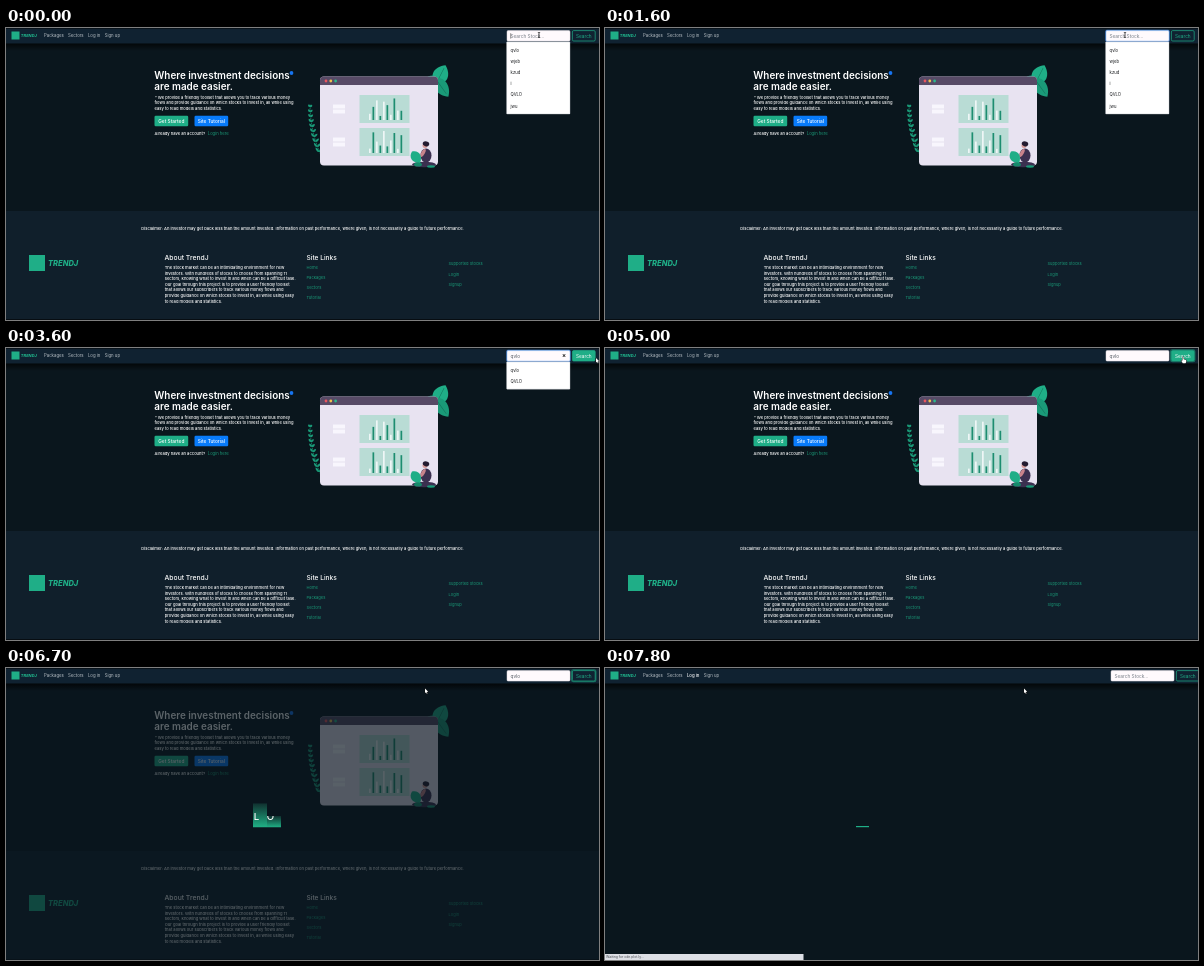
Recreate the animation shown at these times as an HTML page with a canvas. Size 593 by 292 pixels, loop 8 s.

```html
<!DOCTYPE html>
<html lang="en">
<head>
<meta charset="utf-8">
<title>Stock search</title>
<style>
html, body { margin: 0; width: 100%; height: 100%; overflow: hidden; background: #0a161d; }
canvas { display: block; width: 593px; height: 292px; }
</style>
</head>
<body>
<canvas id="stage"></canvas>
<script>
const W = 593, H = 292, LOOP = 8000;
const GREEN = '#1fae87', LEAF = '#1a9a78', NIGHT = '#0a161d', PANEL = '#101f2b', WHITE = '#fff';
const FONT = 'Inter, "Open Sans", sans-serif';
const BRAND = 'TrendJ', MARK = BRAND.toUpperCase(), QUERY = 'qvlo';
const canvas = document.getElementById('stage');
const c = canvas.getContext('2d');
const dpr = window.devicePixelRatio || 1;
canvas.width = W * dpr;
canvas.height = H * dpr;

const ramp = (t, a, b) => Math.max(0, Math.min(1, (t - a) / (b - a)));
const ease = p => p * p * (3 - 2 * p);

// Draws text centred on y and returns its width.
function text(s, x, y, size, { color = WHITE, weight = 400, align = 'left', style = '' } = {}) {
  c.font = `${style} ${weight} ${size}px ${FONT}`;
  c.textAlign = align;
  c.fillStyle = color;
  c.fillText(s, x, y + size * 0.36);
  return c.measureText(s).width;
}

function lines(list, x, y, step, size, look) {
  list.forEach((s, i) => text(s, x, y + i * step, size, look));
}

function rect(x, y, w, h, color) {
  c.fillStyle = color;
  c.fillRect(x, y, w, h);
}

function round(x, y, w, h, r, fill, stroke, lw = 0.7) {
  c.beginPath();
  c.roundRect(x, y, w, h, r);
  if (fill) { c.fillStyle = fill; c.fill(); }
  if (stroke) { c.strokeStyle = stroke; c.lineWidth = lw; c.stroke(); }
}

function oval(x, y, rx, ry, color, turn = 0) {
  c.fillStyle = color;
  c.beginPath();
  c.ellipse(x, y, rx, ry, turn, 0, 7);
  c.fill();
}

const dot = (x, y, r, color) => oval(x, y, r, r, color);

// A pointed leaf from (x, y): length n, half width w, angle a.
function leaf(x, y, n, w, a, color, vein) {
  c.save();
  c.translate(x, y);
  c.rotate(a);
  c.fillStyle = color;
  c.beginPath();
  c.moveTo(0, 0);
  c.bezierCurveTo(n * 0.2, -w * 1.5, n * 0.7, -w * 1.4, n, 0);
  c.bezierCurveTo(n * 0.7, w * 1.4, n * 0.2, w * 1.5, 0, 0);
  c.fill();
  if (vein) rect(0, -0.25, n * 0.85, 0.5, vein);
  c.restore();
}

function plants() {
  const vein = '#137059';
  leaf(433, 57, 14, 5, -2.5, LEAF, vein);
  leaf(430, 56, 21, 7, -1.1, GREEN, vein);
  leaf(429, 50, 23, 6, 0.95, LEAF, vein);
  for (let i = 0; i < 30; i++) {
    const p = i / 30, x = 304 + 11 * p * p, y = 77 + 50 * p;
    dot(x, y, 0.5, LEAF);
    if (i % 3 === 0) [-2.2, -0.75].forEach(a => leaf(x, y + 2, 3 + 3 * p, 1, a, LEAF));
  }
}

function chart(y, phase) {
  rect(353.5, y, 50, 28, '#b9dcd5');
  for (let i = 0; i < 10; i++) {
    const h = 13 + 9 * Math.sin(i * 2.3 + phase);
    rect(363 + i * 3.5, y + 25 - h, 1.7, h, i % 2 ? '#1d8d70' : '#eef6f6');
  }
}

function reader() {
  oval(418, 136.5, 12, 2.8, '#3b3050');
  oval(420, 127.5, 5.5, 7, '#3b3050');
  oval(417, 125, 1.8, 4.5, '#c9838b', 0.5);
  dot(419, 117.5, 2.5, '#d99b98');
  oval(420, 115.8, 3.3, 2.5, '#251c30', 0.3);
  leaf(406, 123.5, 14, 4.5, 0.95, GREEN);
  oval(412, 136.5, 4, 2, '#178a6c');
  oval(425, 138.5, 4, 1.2, LEAF);
}

function picture() {
  plants();
  round(314, 48.5, 118, 89, 4, '#e8e3f1');
  round(314, 48.5, 118, 8.5, [4, 4, 0, 0], '#574a66');
  ['#e95560', '#efc04e', '#2bb88c'].forEach((k, i) => dot(320 + i * 4.8, 53, 1.4, k));
  [67, 100].forEach((y, i) => {
    rect(327, y + 9.5, 12, 9, '#f8f6fd');
    rect(327, y + 13.7, 12, 0.6, '#d9d4e4');
    chart(y, 4 + i);
  });
  reader();
}

function button(s, x, color) {
  round(x, 87.7, 33.7, 10.6, 1.2, color);
  text(s, x + 16.8, 93, 4.8, { weight: 500, align: 'center' });
}

function hero() {
  const body = { weight: 500 };
  rect(0, 0, W, H, NIGHT);
  lines(['Where investment decisions', 'are made easier.'], 148.3, 47, 11, 9.9, { weight: 600 });
  dot(285.5, 45, 1.9, '#1674f0');
  text('“', 148.7, 69.3, 4.1, body);
  text('We provide a friendly toolset that allows you to track various money', 151.8, 69.3, 4.1, body);
  lines(['flows and provide guidance on which stocks to invest in, all while using',
    'easy to read models and statistics.'], 148.5, 74.9, 5.6, 4.1, body);
  button('Get Started', 148.5, GREEN);
  button('Site Tutorial', 188.5, '#087bfa');
  text('Already have an account?', 148.5, 105.5, 4.1, body);
  text('Login here', 201.8, 105.5, 4.15, { color: LEAF });
  picture();
}

function footer() {
  const body = { weight: 500 }, link = { color: LEAF };
  rect(0, 183, W, 108, PANEL);
  rect(0, 291, W, 1, '#070d12');
  text('Disclaimer: An investor may get back less than the amount invested. Information on past performance, ' +
    'where given, is not necessarily a guide to future performance.', 296.5, 200.3, 4.1, { weight: 500, align: 'center' });
  rect(23, 227, 16, 16, GREEN);
  text(MARK, 42, 235.5, 7.5, { color: GREEN, weight: 800, style: 'italic' });
  text('About ' + BRAND, 158.5, 230, 6.8, body);
  lines(['The stock market can be an intimidating environment for new',
    'investors. With hundreds of stocks to choose from spanning 11',
    'sectors, knowing what to invest in and when can be a difficult task.',
    'Our goal through this project is to provide a user friendly toolset',
    'that allows our subscribers to track various money flows and',
    'provide guidance on which stocks to invest in, all while using easy',
    'to read models and statistics.'], 158.7, 239.5, 5.6, 4.1, body);
  text('Site Links', 300.5, 230, 6.6, body);
  lines(['Home', 'Packages', 'Sectors', 'Tutorial'], 300.5, 239.4, 10.05, 4.1, link);
  lines(['Supported Stocks', 'Login', 'Signup'], 442.5, 236, 10.05, 4.05, link);
}

// Letters shown through bars that rise and sink one after another.
function loader(t) {
  [...'LOADING'].forEach((ch, i) => {
    const p = ramp(t, 6540 + i * 100, 7030 + i * 100);
    const h = 24.3 * Math.min(1, 1.25 * Math.sin(Math.PI * p));
    if (h < 0.3) return;
    const x = 247 + i * 14, top = 159.5 - h;
    const g = c.createLinearGradient(0, top, 0, 159.5);
    g.addColorStop(0, '#10302f');
    g.addColorStop(1, '#20b286');
    c.save();
    c.beginPath();
    c.rect(x, top, 14, h);
    c.clip();
    rect(x, top, 14, h, g);
    text(ch, x + 3.5, 148.5, 9.6, { weight: 500, align: 'center' });
    c.restore();
  });
}

// Pointer moves: start, end, then the place reached
const MOVES = [[100, 1300, 520, 7], [2400, 2600, 570, 47], [3000, 3600, 590, 10],
  [3700, 4400, 578, 9], [5400, 6200, 419, 20.5]];

function pointerAt(t) {
  return MOVES.reduce(([x, y], [a, b, toX, toY]) => {
    const p = ease(ramp(t, a, b));
    return [x + (toX - x) * p, y + (toY - y) * p];
  }, [533, 7]);
}

const SHAPES = {
  beam: 'M-.4-2.7V2.7H.4V-2.7ZM-1.2-3V-2.5H1.2V-3ZM-1.2 2.5V3H1.2V2.5Z',
  arrow: 'M0 0V4.6L1.1 3.7 1.8 5.3 2.5 5 1.8 3.4 3.2 3.3Z',
  hand: 'M-.5 0H.6V2.3L3.2 3V5L2.5 6.2H-.2L-1.8 3.7-.5 3.6Z'
};

function pointer(x, y, kind) {
  const path = new Path2D(SHAPES[kind]);
  c.save();
  c.translate(x, y);
  c.lineWidth = 0.9;
  c.strokeStyle = '#111';
  c.fillStyle = kind === 'beam' ? '#222' : WHITE;
  if (kind !== 'beam') c.stroke(path);
  c.fill(path);
  c.restore();
}

function bar(fresh) {
  const shade = c.createLinearGradient(0, 15, 0, 23);
  shade.addColorStop(0, 'rgba(0,0,0,.75)');
  shade.addColorStop(1, 'rgba(0,0,0,0)');
  rect(0, 15, W, 8, shade);
  rect(0, 0, W, 15.5, '#102231');
  rect(0, 0, W, 1, '#08121a');
  rect(5.5, 3.5, 8, 8, GREEN);
  text(MARK, 14.8, 8, 4, { color: GREEN, weight: 800, style: 'italic' });
  let x = 38;
  for (const s of ['Packages', 'Sectors', 'Log in', 'Sign up']) {
    const lit = fresh && s === 'Log in';
    x += 4.3 + text(s, x, 7.7, 4.3, { color: lit ? WHITE : '#b9c0c6', weight: lit ? 500 : 400 });
  }
}

function search(t, fresh, hover) {
  const dx = fresh ? 5 : 0, focused = t < 4200;
  const typed = fresh ? '' : QUERY.slice(0, Math.max(0, Math.ceil((t - 1800) / 130)));
  const glow = ramp(t, 100, 300) * (1 - ramp(t, 4200, 4300));
  round(500.3, 1.8, 64.4, 12.1, 1.6, `rgba(70,140,235,${glow * 0.7})`);
  round(501 + dx, 2.6, 63, 10.5, 1.2, '#fffafd', glow > 0.5 ? '#86b9f5' : '#dcd8df', 0.5);
  const w = text(typed || 'Search Stock...', 504.5 + dx, 8, 4.75, { color: typed ? '#555c63' : '#767d85' });
  if (focused && t % 1000 < 500) rect(504.6 + (typed && w), 5.2, 0.5, 5.4, '#222');
  if (focused && typed) text('×', 558, 7.9, 6, { color: '#222', weight: 700, align: 'center' });

  if (t > 4400 && !fresh) round(565.6, 1.8, 24.3, 12, 1.8, null, 'rgba(31,174,135,.55)', 1.1);
  round(566.4 + dx, 2.6, 22.8, 10.4, 1.3, hover ? GREEN : null, GREEN);
  text('Search', 577.8 + dx, 8, 4.75, { color: hover ? WHITE : GREEN, align: 'center' });

  if (focused) {
    const hits = [QUERY, 'wjeb', 'kzud', 'i', QUERY.toUpperCase(), 'jwu']
      .filter(s => s.toLowerCase().startsWith(typed));
    round(500.6, 13.8, 63.4, 5 + hits.length * 11.2, 0.6, WHITE, '#b9bcc2', 0.4);
    lines(hits, 504.6, 22, 11.2, 4.2, { color: '#15171a' });
  }
}

function draw(t) {
  c.setTransform(dpr, 0, 0, dpr, 0, 0);
  const fresh = t >= 7400;
  const [x, y] = pointerAt(t);
  const hover = t > 3000 && x > 566 && x < 590.5 && y < 14;
  if (fresh) {
    rect(0, 0, W, H, NIGHT);
    rect(251, 158, 13, 1.2, GREEN);
    rect(0, 286, 198.5, 6, '#dddfe5');
    text('Waiting for cdn.plot.ly...', 1, 289.2, 3.4, { color: '#4b4f55' });
  } else {
    hero();
    footer();
    c.globalAlpha = 0.92 * ease(ramp(t, 6420, 6850)) + 0.08 * ramp(t, 6920, 7150);
    rect(0, 0, W, H, NIGHT);
    c.globalAlpha = 1;
    loader(t);
  }
  bar(fresh);
  search(t, fresh, hover);
  pointer(x, y, t < 2430 ? 'beam' : hover && x < 588.5 ? 'hand' : 'arrow');
}

function frame() {
  draw(performance.now() % LOOP);
  requestAnimationFrame(frame);
}
frame();
</script>
</body>
</html>
```
